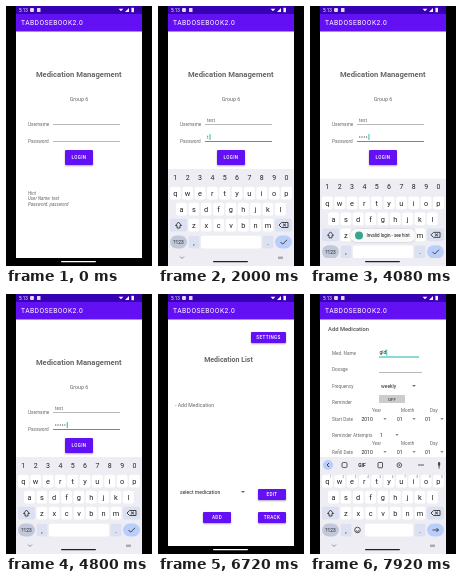
An HTML page with a canvas for the animation above (8000 ms loop, 146 by 260 pixels).

```html
<!DOCTYPE html>
<html lang="en">
<head>
<meta charset="utf-8">
<title>Medication app</title>
<style>
html, body { margin: 0; width: 100%; height: 100%; overflow: hidden; background: #000; }
canvas { display: block; width: 100%; height: 100%; }
</style>
</head>
<body>
<canvas></canvas>
<script>
const W = 146, H = 260, LOOP = 8000, STEP = 80;
const LEFT = 10, RIGHT = 136, KEYBOARD_TOP = 163;
const PURPLE = '#6310f4', TEAL = '#12b5a6', GRAY = '#666', INK = '#222';
const KEYBOARD = '#eeedf4', SOFT_KEY = '#dce1f2', DARK_KEY = '#c0c8da', ENTER_KEY = '#b9cefa';
const canvas = document.querySelector('canvas');
const ctx = canvas.getContext('2d');

const clamp = v => Math.max(0, Math.min(1, v));
const span = (t, from, to) => clamp((t - from) / (to - from));
const during = (t, from, to) => t >= from && t < to;
const easeOut = (p, power) => 1 - (1 - p) ** power;

function rect(x, y, w, h, color, radius = 0) {
  ctx.fillStyle = color;
  ctx.beginPath();
  ctx.roundRect(x, y, w, h, radius);
  ctx.fill();
}

function outline(x, y, w, h, radius) {
  ctx.strokeStyle = '#444';
  ctx.lineWidth = 0.9;
  ctx.beginPath();
  ctx.roundRect(x, y, w, h, radius);
  ctx.stroke();
}

function circle(x, y, r, color) {
  ctx.fillStyle = color;
  ctx.beginPath();
  ctx.arc(x, y, r, 0, Math.PI * 2);
  ctx.fill();
}

function line(points, color = INK, width = 0.8) {
  ctx.strokeStyle = color;
  ctx.lineWidth = width;
  ctx.beginPath();
  points.forEach(([x, y]) => ctx.lineTo(x, y));
  ctx.stroke();
}

// y is the vertical middle of the capitals
function text(str, x, y, size, color = GRAY, style = '', align = 'left') {
  ctx.font = `${style} ${size}px Roboto, sans-serif`;
  ctx.textAlign = align;
  ctx.fillStyle = color;
  ctx.fillText(str, x, y + size * 0.36);
}

function spacedText(spacing, ...args) {
  ctx.letterSpacing = spacing + 'px';
  text(...args);
  ctx.letterSpacing = '0px';
}

function triangle(x, y, r, color) {
  ctx.fillStyle = color;
  ctx.beginPath();
  ctx.moveTo(x - r, y - r / 2);
  ctx.lineTo(x + r, y - r / 2);
  ctx.lineTo(x, y + r / 2);
  ctx.fill();
}

function button(label, x, y, w, h, pressed = false) {
  ctx.save();
  ctx.shadowColor = '#0005';
  ctx.shadowBlur = 2;
  ctx.shadowOffsetY = 1;
  rect(x, y, w, h, pressed ? '#8a42f4' : PURPLE, 1);
  ctx.restore();
  spacedText(0.35, label, x + w / 2, y + h / 2, 4.6, '#fff', '500', 'center');
}

function field(x, y, w, focused) {
  rect(x, y, w, focused ? 1 : 0.6, focused ? TEAL : '#777');
}

function cursor(x, y) {
  rect(x, y - 3, 0.9, 6, TEAL);
}

function bars() {
  rect(LEFT, 0, 126, H, '#fff');
  rect(LEFT, 0, 126, 8, '#3700b3');
  rect(LEFT, 8, 126, 17.5, PURPLE);
}

function appFrame() {
  bars();
  spacedText(0.45, 'TABDOSEBOOK2.0', 15, 17, 6.7, '#fff');
  rect(LEFT, 252, 126, 8, '#000');
  rect(55, 255, 35, 1.2, '#fff', 0.6);
}

function statusBar() {
  text('5:13', 13, 4, 4.6, '#fff');
  rect(24, 2, 4, 4, '#ddd', 1);
  rect(31, 2, 3.5, 4, '#ddd', 0.5);
  triangle(115, 4, 2.4, '#fff');
  ctx.fillStyle = '#fff';
  ctx.beginPath();
  ctx.moveTo(119, 6);
  ctx.lineTo(123, 6);
  ctx.lineTo(123, 2);
  ctx.fill();
  rect(125.5, 1.8, 2.4, 4.4, '#fff', 0.5);
}

function loginPage(t) {
  const userLength = Math.max(0, Math.min(4, Math.floor((t - 1520) / STEP)));
  const dots = t < 2000 ? 0 : t < 4240 ? Math.min(4, Math.floor((t - 1920) / STEP)) : 5;
  const onPassword = t >= 1920, onUser = t >= 960 && !onPassword;
  appFrame();
  text('Medication Management', 72.7, 68, 7.65, GRAY, 'bold', 'center');
  text('Group 6', 73, 93, 5.3, GRAY, '', 'center');
  text('Username', 22, 118, 4.7);
  text('Password', 22, 135, 4.7);
  field(47, 118, 67, onUser);
  field(47, 135, 67, onPassword);
  const user = 'test'.slice(0, userLength);
  text(user, 49, 114, 4.7);
  if (onUser) cursor(49.5 + ctx.measureText(user).width, 114);
  if (dots === 1) text('t', 49, 131, 4.7);
  else for (let i = 0; i < dots; i++) circle(49.7 + i * 2.3, 131, 0.65, GRAY);
  if (onPassword) cursor(49.3 + dots * 2.3, 131);
  button('LOGIN', 59, 144, 28, 15, during(t, 2320, 2480) || during(t, 4960, 5120));
  text('Hint', 22, 187, 4.5, GRAY, 'italic');
  text('User Name: test', 22, 192.5, 4.5, GRAY, 'italic');
  text('Password: password', 22, 198, 4.5, GRAY, 'italic');
}

function listPage(t) {
  appFrame();
  button('SETTINGS', 93, 38, 35, 11);
  text('Medication List', 70.5, 65, 7, GRAY, 'bold', 'center');
  text('- Add Medication', 17, 111, 5.2);
  text('select medication', 22, 198, 5.1, INK);
  triangle(85, 198, 2, GRAY);
  button('EDIT', 100, 195, 28, 11);
  button('ADD', 45, 218, 28, 11, during(t, 6320, 6640));
  button('TRACK', 100, 218, 28, 11);
}

function dateRow(label, y) {
  text(label, 22, y, 4.7);
  [['Year', 62, '2010', 51.5, 75], ['Month', 91, '01', 87, 104], ['Day', 120, '01', 115, 132]]
    .forEach(([heading, hx, value, x, arrow]) => {
      text(heading, hx, y - 9, 4.6);
      text(value, x, y, 5, INK);
      triangle(arrow, y, 1.7, GRAY);
    });
}

function addPage(t) {
  const focused = t >= 7600;
  appFrame();
  text('Add Medication', 18, 35, 5.8, GRAY, 'bold');
  text('Med. Name', 22, 59, 4.7);
  field(69, 62.5, 40, focused);
  if (t >= 7840) text('gld', 69.5, 58.5, 5, INK);
  if (focused) cursor(t >= 7840 ? 76.3 : 69.5, 58.5);
  text('Dosage', 22, 75, 4.7);
  field(69, 78.5, 43);
  text('Frequency', 22, 92, 4.7);
  text('weekly', 71, 92, 5, INK);
  triangle(104, 92, 1.8, GRAY);
  text('Reminder', 22, 108, 4.7);
  rect(69, 101, 26, 8, '#ccc', 0.7);
  text('OFF', 82, 105, 4.4, INK, '', 'center');
  dateRow('Start Date', 125);
  text('Reminder Attempts', 22, 141, 4.7);
  text('1', 70, 141, 5, INK);
  triangle(87, 141, 1.7, GRAY);
  dateRow('Refill Date', 158);
}

function keyRow(letters, x, y, hints) {
  [...letters].forEach((letter, i) => {
    const cx = x + i * 12.35;
    rect(cx - 5.4, y - 6.3, 10.8, 12.8, '#fff', 2);
    text(letter, cx, y, 7.4, INK, '', 'center');
    if (hints) text((i + 1) % 10, cx + 3.6, y - 4, 2.8, GRAY, '', 'center');
  });
}

function toolbar() {
  circle(18, 171, 5, ENTER_KEY);
  line([[19, 169], [17, 171], [19, 173]]);
  outline(32, 168.5, 5, 5, 1.3);
  text('GIF', 52, 171, 4.8, INK, 'bold', 'center');
  outline(68, 168.5, 4.5, 5.3, 0.6);
  outline(87, 168.8, 4.6, 4.6, 2.3);
  circle(89.3, 171.1, 0.8, '#444');
  [-2, 0, 2].forEach(dx => circle(111 + dx, 171, 0.7, INK));
  rect(128, 168, 2.2, 4, '#444', 1.1);
  line([[129.1, 172], [129.1, 174.5]]);
}

function keyboard(offset, textMode) {
  if (offset >= H - KEYBOARD_TOP) return;
  ctx.save();
  ctx.beginPath();
  ctx.rect(LEFT, KEYBOARD_TOP, 126, H - KEYBOARD_TOP);
  ctx.clip();
  ctx.translate(0, offset);
  rect(LEFT, KEYBOARD_TOP, 126, 97, KEYBOARD);
  if (textMode) toolbar();
  else [...'1234567890'].forEach((d, i) => text(d, 17.3 + i * 12.35, 171, 7, INK, '', 'center'));
  keyRow('qwertyuiop', 17.3, 187, textMode);
  keyRow('asdfghjkl', 23.5, 203);
  keyRow('zxcvbnm', 35.9, 219);
  [12, 117].forEach(x => rect(x, 212.7, 17, 12.8, SOFT_KEY, 2));
  line([[17.5, 219.5], [20.5, 216], [23.5, 219.5], [22, 219.5], [22, 222], [19, 222], [19, 219.5], [17.5, 219.5]]);
  line([[121, 219], [123.5, 216.5], [130, 216.5], [130, 221.5], [123.5, 221.5], [121, 219]]);
  line([[125, 217.7], [128, 220.3]]);
  line([[128, 217.7], [125, 220.3]]);

  rect(12, 229.5, 17, 13, DARK_KEY, 6.5);
  text('?123', 20.5, 236, 4.8, INK, '', 'center');
  rect(30.8, 229.7, 10.8, 12.8, SOFT_KEY, 2);
  text(',', 36, 236, 7, INK, '', 'center');
  const spaceLeft = textMode ? 55 : 43;
  if (textMode) {
    outline(44.7, 233.2, 5.6, 5.6, 2.8);
    line([[46, 236.5], [47.5, 237.6], [49, 236.5]]);
  }
  rect(spaceLeft, 229.7, 103 - spaceLeft, 12.8, '#fff', 2);
  rect(104.5, 229.7, 10.8, 12.8, SOFT_KEY, 2);
  text('.', 110, 236, 7, INK, '', 'center');
  rect(117, 229.5, 17, 13, ENTER_KEY, 6.5);
  if (textMode) {
    line([[122.5, 236], [128.5, 236]]);
    line([[126.5, 234], [128.5, 236], [126.5, 238]]);
  } else line([[122.5, 236], [124.7, 238.2], [129, 233.8]]);
  line([[22, 250.5], [24, 252.5], [26, 250.5]], '#777');
  rect(120, 250.5, 5, 2.5, '#aaa', 0.5);
  ctx.restore();
  // the strip behind the home bar turns light at once
  if (offset > 8) rect(LEFT, Math.max(252, KEYBOARD_TOP + offset), 126, 8, KEYBOARD);
  rect(55, 255, 35, 1.2, INK, 0.6);
}

function slideOffset(t, upAt, downAt = LOOP) {
  const up = easeOut(span(t, upAt, upAt + 320), 1.65);
  const down = span(t, downAt, downAt + 320) ** 1.65;
  return (H - KEYBOARD_TOP) * (1 - up + down);
}

function toast(t) {
  const alpha = span(t, 2560, 2720) * (1 - span(t, 4320, 4560));
  if (!alpha) return;
  ctx.save();
  ctx.globalAlpha = alpha;
  ctx.shadowColor = '#0004';
  ctx.shadowBlur = 2;
  rect(40, 223, 66, 13, '#fafafa', 6.5);
  ctx.shadowBlur = 0;
  circle(49, 229.5, 4, '#3aa58c');
  text('Invalid login - see hint', 56.5, 229.5, 4.5, '#111');
  ctx.restore();
}

function loginScene(t) {
  loginPage(t);
  keyboard(t < 3840 ? slideOffset(t, 1040, 3440) : slideOffset(t, 3840), false);
  toast(t);
}

function addScene(t) {
  addPage(t);
  keyboard(slideOffset(t, 7520), true);
}

function layer(scene, t, x, alpha) {
  ctx.save();
  if (alpha < 1) ctx.globalAlpha = alpha;
  ctx.translate(x, 0);
  scene(t);
  ctx.restore();
}

// The next page fades in from the right while the old one drifts left.
function openPage(t, start, from, to) {
  const p = span(t, start, start + 480), shift = 12.6, moved = easeOut(p, 1.3);
  bars();
  if (p < 1) layer(from, t, -shift * moved, 1);
  if (p > 0) layer(to, t, shift * (1 - moved), clamp(p * 1.3));
}

function draw(t) {
  const scale = devicePixelRatio || 1;
  const w = Math.round(innerWidth * scale), h = Math.round(innerHeight * scale);
  if (canvas.width !== w || canvas.height !== h) {
    canvas.width = w;
    canvas.height = h;
  }
  ctx.setTransform(w / W, 0, 0, h / H, 0, 0);
  rect(0, 0, W, H, '#000');
  ctx.save();
  ctx.beginPath();
  ctx.rect(LEFT, 0, RIGHT - LEFT, H);
  ctx.clip();
  if (t < 6320) openPage(t, 5520, loginScene, listPage);
  else openPage(t, 6960, listPage, addScene);
  statusBar();
  ctx.restore();
}

const startTime = performance.now();
function tick() {
  const t = (performance.now() - startTime) % LOOP;
  draw(Math.floor(t / STEP) * STEP);
  requestAnimationFrame(tick);
}
tick();
</script>
</body>
</html>
```
